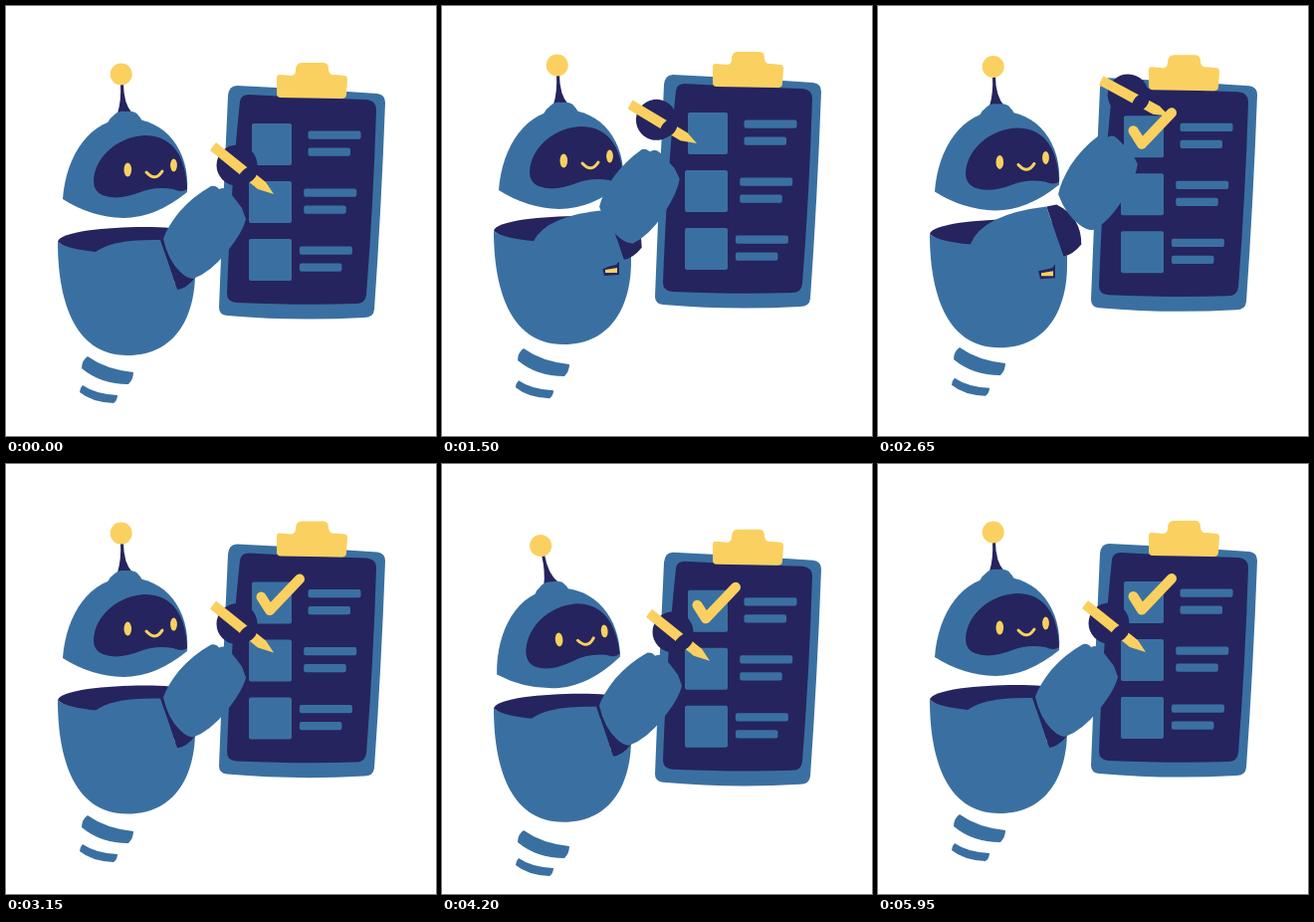
Animation, 432 px wide and 432 px high, one loop 6 s. Source, as an HTML page:

```html
<!DOCTYPE html>
<html lang="en">
<head>
<meta charset="utf-8">
<title>Robot with checklist</title>
<style>
  html, body { margin: 0; width: 100%; height: 100%; overflow: hidden; background: #fff; }
  svg { display: block; width: 100vw; height: 100vh; }
  .blue { fill: #3a70a1; }
  .dark { fill: #25245e; }
  .gold { fill: #fad060; }
  .line { fill: none; stroke: #fad060; stroke-linecap: round; stroke-linejoin: round; }
</style>
</head>
<body>
<svg viewBox="0 0 432 432">
  <g id="board">
    <path class="blue" d="M223 90Q224 80 232 80Q300 83 373 88Q381 89 381 97Q377 205 370 305Q369 313 360 313Q290 317 222 311Q214 310 214 303Q218 196 223 90Z"/>
    <path class="dark" d="M235 96Q236 89 244 89Q300 92 362 94Q372 95 372 104Q369 200 362 290Q361 299 352 299Q300 301 231 298Q222 297 222 289Q226 180 235 96Z"/>
    <path class="gold" d="M275 69L287 70Q291 69 291 65Q291 57 297 57H319Q324 57 324 64Q325 70 330 69L340 70Q343 70 343 74L342 89Q342 93 337 93L276 92Q272 92 272 88V72Q272 69 275 69Z"/>
    <g id="rows" class="blue"></g>
    <path id="check" class="line" stroke-width="10" d="M256.5 133L265 146.5L295 115"/>
  </g>

  <path id="tail1" class="blue" d="M82 352Q100 365 128 368Q128 375 123 380Q95 380 76 364Q76 356 82 352Z"/>
  <path id="tail2" class="blue" d="M77 381Q90 390 112 391Q112 396 108 399Q86 398 74 388Q74 384 77 381Z"/>

  <g id="body">
    <path class="dark" d="M52 237C54 224 130 220 165 223Q190 226 190 240V262L89 262Z"/>
    <path class="blue" d="M52 237C52 290 66 351 122 351C172 351 190 310 190 268V240C170 252 70 252 52 237Z"/>
    <path class="dark" d="M161 274L175 271L178 267V281L163 282Z"/>
    <path class="gold" d="M164 276L176 274V279H164Z"/>
  </g>

  <g id="head">
    <g id="antenna">
      <path class="dark" d="M115 78H118Q118 98 127 108Q119 112 112 108Q116 95 115 78Z"/>
      <circle class="gold" cx="115.7" cy="68.5" r="11"/>
    </g>
    <path class="blue" d="M101 124Q102 114 107 111Q112 105 120 106Q130 105 133 110Q138 114 138 124Z"/>
    <path class="blue" d="M57 194C60 150 85 113 122 113C160 113 185 145 182 187Q150 213 118 213Q85 212 57 194Z"/>
    <path class="dark" d="M88 176C89 150 115 130 141 130C168 131 181 152 182 184Q177 188 168 184Q150 181 135 187Q112 196 97 190Q88 186 88 176Z"/>
    <ellipse class="gold" cx="122.3" cy="164.5" rx="3.8" ry="7"/>
    <ellipse class="gold" cx="168.5" cy="160" rx="3.4" ry="6.5"/>
    <path class="line" stroke-width="3" d="M141 167Q150 177 157 166"/>
  </g>

  <g id="arm">
    <g id="hand">
      <circle class="dark" cx="232" cy="160" r="20.5"/>
      <path class="gold" d="M211 137L205 145L253 184L269 189L261 177Z"/>
      <ellipse class="dark" cx="243" cy="170" rx="11" ry="7" transform="rotate(-40 243 170)"/>
    </g>
    <path id="cuff" class="dark" d="M155 235L172 285Q181 284 190 273Q190 245 165 233Z"/>
    <path id="upper" class="blue"/>
    <path id="fore" class="blue" d="M158 234Q162 222 174 207Q188 191 206 181Q211 180 214 184Q220 181 224 186L237 203L241 214Q238 227 222 247Q205 268 188 274Q182 274 175 267Q163 256 158 234Z"/>
  </g>
</svg>
<script>
const LOOP = 6000, STEP = 50;
const $ = id => document.getElementById(id);
const check = $('check'), checkLength = check.getTotalLength();

// Three list rows: a box and two bars, drifting left down the page
for (let i = 0; i < 3; i++) {
  const x = i ? 244 : 247, y = 118 + 58 * i, bar = 303.5 - 4.3 * i;
  $('rows').innerHTML +=
    `<rect x="${x}" y="${y}" width="${287 - x}" height="42" rx="2"/>
     <rect x="${bar}" y="${y + 7.5}" width="53" height="8.3" rx="2"/>
     <rect x="${bar}" y="${y + 24.5}" width="42.5" height="8.3" rx="2"/>`;
}

// Cosine ease from 0 to 1 between two times
function ease(t, from, to) {
  const p = Math.min(1, Math.max(0, (t - from) / (to - from)));
  return (1 - Math.cos(Math.PI * p)) / 2;
}

// Float up, sink below rest and return; a lag of 1 trails the body the most
function float(t, up, down, lag) {
  const top = 2000 + 200 * lag;
  return -up * ease(t, 850 * lag, top)
    + (up + down) * ease(t, top, 4000 + 250 * lag)
    - down * ease(t, 4000 + 850 * lag, LOOP - 180 * lag);
}

function place(id, x, y, turn = 0, cx = 0, cy = 0) {
  $(id).setAttribute('transform', `translate(${x} ${y}) rotate(${turn} ${cx} ${cy})`);
}

function drawArm(t) {
  const lift = ease(t, 650, 1980) - ease(t, 2580, 3080);
  const done = checkLength * ease(t, 1980, 2580);
  const arc = -20 * lift * (1 - lift);

  // The pencil tip travels from rest to the check mark and follows its stroke
  const rest = { x: 269, y: 189 }, pen = check.getPointAtLength(done);
  place('hand', (pen.x - rest.x) * lift + arc, (pen.y - rest.y) * lift, -11 * lift, rest.x, rest.y);
  place('fore', (8 + (pen.x - 263) / 2) * lift + arc, (-31 + (pen.y - 142) / 2) * lift, -8 * lift, 199, 228);

  const dx = 15 * lift, dy = -27 * lift;
  place('cuff', dx, dy);
  $('upper').setAttribute('d',
    `M${89 + 4 * lift} ${248 - lift}Q105 ${234 - 18 * lift} ${155 + dx} ${235 + dy}` +
    `L${172 + dx} ${285 + dy}L${150 + dx} ${295 + dy}L120 ${292 + dy}Z`);

  check.style.visibility = done > 0 ? 'visible' : 'hidden';
  check.setAttribute('stroke-dasharray', `${done} ${2 * checkLength}`);
}

function draw(t) {
  const bob = float(t, 13, 9, 0);
  for (const id of ['board', 'body', 'arm']) place(id, 0, bob);
  place('tail1', 0, float(t, 13, 16, .75));
  place('tail2', 0, float(t, 10, 15, 1));

  const tilt = ease(t, 3300, 4100) - ease(t, 4300, 5050);
  place('head', -2.5 * tilt, float(t, 12, 12, .4), -5 * tilt, 120, 190);
  place('antenna', 0, 0, -5 * tilt, 119, 110);
  drawArm(t);
}

const start = performance.now();
function frame() {
  const t = (performance.now() - start) % LOOP;
  draw(Math.floor(t / STEP) * STEP);
  requestAnimationFrame(frame);
}
frame();
</script>
</body>
</html>
```
